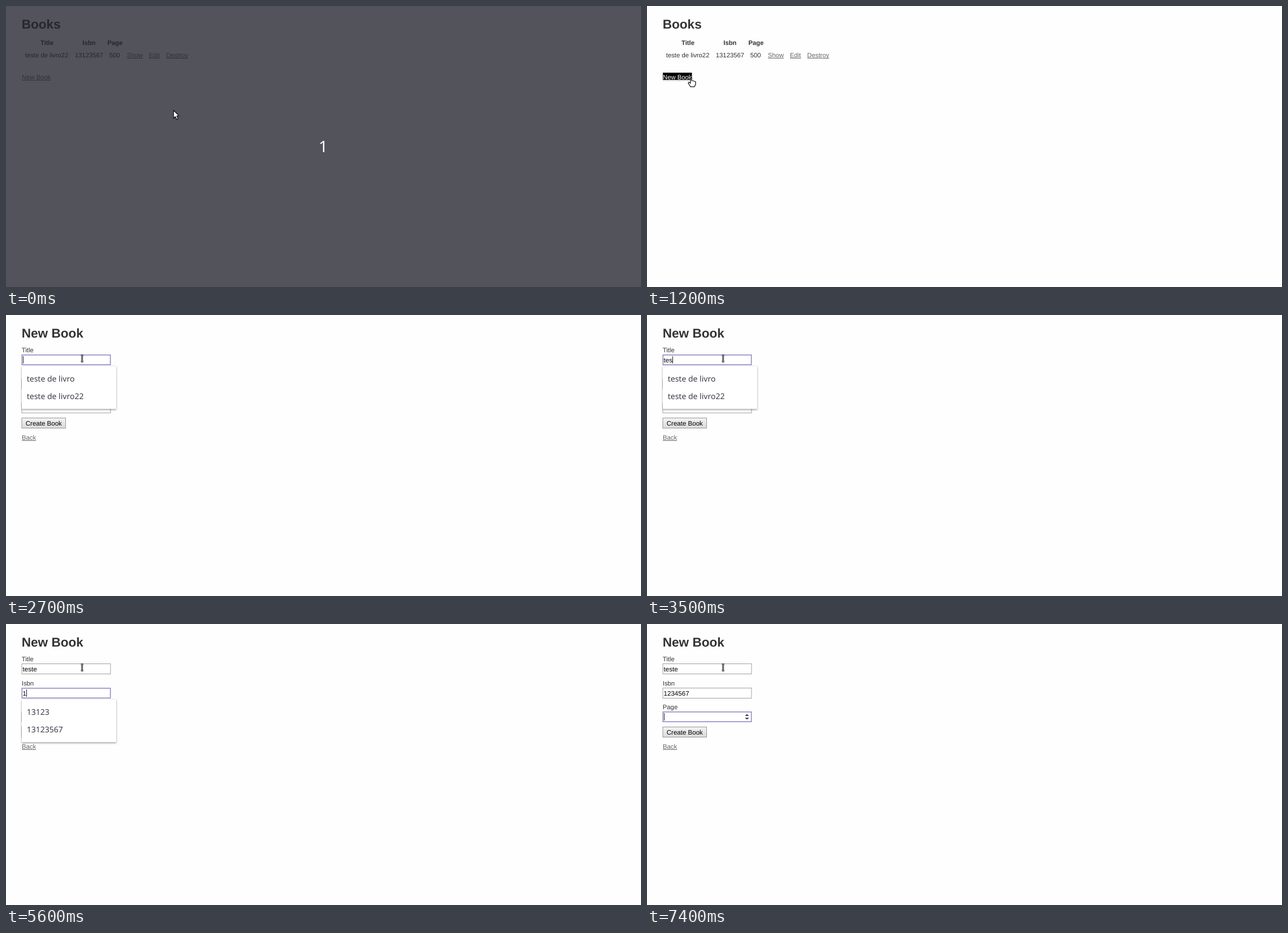
These frames come from a looping animation (1124x498 px, 8 s). An HTML page with a canvas:

```html
<!DOCTYPE html>
<html lang="en">
<head>
<meta charset="utf-8">
<title>New book form</title>
<style>
  html, body { margin: 0; width: 100%; height: 100%; overflow: hidden; background: #fefefe; }
  canvas { display: block; }
</style>
</head>
<body>
<canvas id="stage" width="1124" height="498"></canvas>
<script>
const ctx = document.getElementById('stage').getContext('2d');
const LOOP = 8000, STEP = 100;
const SANS = '"Liberation Sans", Arial, sans-serif';
const BODY = `11.3px ${SANS}`, BOLD = `bold 11.3px ${SANS}`;
const HEADING = `bold 22.6px ${SANS}`, CONTROL = `11.56px ${SANS}`;
const MENU = '500 14px "Noto Sans", "Open Sans", sans-serif';
const FIELD_TOP = [70, 113, 155];

// Each entry holds from its time until the next one.
const cursorKeys = [
  [0, 296, 184, 'arrow'], [1200, 78, 127, 'hand'], [1500, 79, 127, 'arrow'],
  [1800, 204, 137, 'arrow'], [2000, 161, 124.5, 'beam'], [2200, 149, 98, 'arrow'],
  [2300, 138, 80, 'beam'], [2400, 134.7, 77, 'beam']
];
const titleKeys = [[0, ''], [3400, 'te'], [3500, 'tes'], [4000, 'test'], [4100, 'teste']];
const isbnKeys = [[0, ''], [5500, '1'], [5800, '12'], [6000, '123'], [6200, '1234'],
  [6400, '12345'], [6600, '123456'], [6900, '1234567']];
const focusKeys = [[0, -1], [2500, 0], [4200, 1], [7400, 2]];
const caretKeys = [[0, true], [3100, false], [3400, true], [4600, false], [5200, true]];
const menuKeys = [
  [0, null], [2600, ['teste de livro', 'teste de livro22']],
  [4200, null], [5600, ['13123', '13123567']], [5800, null]
];

const keyAt = (keys, t) => keys.findLast(key => key[0] <= t);
const valueAt = (keys, t) => keyAt(keys, t)[1];

function text(str, x, y, font = BODY, color = '#333') {
  ctx.font = font;
  ctx.fillStyle = color;
  ctx.fillText(str, x, y);
  return ctx.measureText(str).width;
}

function link(str, x, y, hover = false) {
  ctx.font = BODY;
  const width = ctx.measureText(str).width;
  if (hover) {
    ctx.fillStyle = '#000';
    ctx.fillRect(x, y - 11.5, width, 14);
  }
  text(str, x, y, BODY, hover ? '#fff' : '#666');
  ctx.fillRect(x, Math.round(y) + 1, width, 1);
}

function box(x, y, w, h, fill, stroke, line = 1) {
  ctx.fillStyle = fill;
  ctx.fillRect(x, y, w, h);
  ctx.strokeStyle = stroke;
  ctx.lineWidth = line;
  ctx.strokeRect(x + line / 2, y + line / 2, w - line, h - line);
}

function polygon(points) {
  ctx.beginPath();
  points.forEach(([x, y]) => ctx.lineTo(x, y));
  ctx.closePath();
}

function drawCursor(x, y, shape) {
  ctx.save();
  ctx.translate(x, y);
  ctx.lineJoin = 'round';
  if (shape === 'beam') {
    const beam = new Path2D('M-2 -5.5 Q0 -5.5 0 -4.5 Q0 -5.5 2 -5.5 M0 -4.5 V4.5 M-2 5.5 Q0 5.5 0 4.5 Q0 5.5 2 5.5');
    for (const [color, width] of [['#111', 2.8], ['#fff', 0.8]]) {
      ctx.strokeStyle = color;
      ctx.lineWidth = width;
      ctx.stroke(beam);
    }
  } else {
    if (shape === 'arrow') {
      polygon([[.6, .8], [.6, 15], [3.7, 12], [6, 17], [8.4, 15.9], [6.2, 11], [10, 10.6]]);
    } else {
      polygon([[-1, 0], [1, 0], [1, 5], [8, 7], [8, 12], [6, 16], [-1, 16], [-5, 10], [-4, 8], [-1, 10]]);
    }
    ctx.fillStyle = '#fff';
    ctx.strokeStyle = '#111';
    ctx.lineWidth = 1.25;
    ctx.fill();
    ctx.stroke();
  }
  ctx.restore();
}

function drawList(hover) {
  text('Books', 27.7, 40, HEADING);
  text('Title', 61, 69, BOLD);
  text('Isbn', 135.3, 69, BOLD);
  text('Page', 179.5, 69, BOLD);
  text('teste de livro22', 33.8, 90.5);
  text('13123567', 121.8, 90.5);
  text('500', 182.7, 90.5);
  link('Show', 214, 90.5);
  link('Edit', 253, 90.5);
  link('Destroy', 283.6, 90.5);
  link('New Book', 28, 129.7, hover);
}

function drawSpinner(y) {
  ctx.fillStyle = '#444';
  for (const side of [-1, 1]) {
    polygon([[173.3, y + side * 1.5], [180.7, y + side * 1.5], [177, y + side * 5]]);
    ctx.fill();
  }
}

function drawMenu(items, top) {
  ctx.save();
  ctx.shadowColor = 'rgba(0,0,0,.4)';
  ctx.shadowBlur = 3;
  ctx.shadowOffsetY = 1;
  ctx.fillStyle = '#fff';
  ctx.fillRect(28, top + 21, 167, 75.5);
  ctx.restore();
  items.forEach((item, i) => text(item, 36.7, top + 48 + i * 31, MENU, '#3b3b48'));
}

function drawForm(t) {
  const focus = valueAt(focusKeys, t);
  const values = [valueAt(titleKeys, t), valueAt(isbnKeys, t), ''];
  text('New Book', 27.7, 40, HEADING);
  ['Title', 'Isbn', 'Page'].forEach((label, i) => {
    const top = FIELD_TOP[i], active = i === focus;
    text(label, 27.8, top - 4.2);
    box(27.5, top, 158, 19, '#fff', active ? '#918bc4' : '#a0a0a0', active ? 1.6 : 1);
    const width = text(values[i], 29.6, top + 13.5, CONTROL, '#000');
    if (active && valueAt(caretKeys, t)) {
      ctx.fillStyle = '#222';
      ctx.fillRect(Math.round(29.6 + width), top + 3, 1, 13);
    }
  });
  if (focus === 2) drawSpinner(164.5);

  const shade = ctx.createLinearGradient(0, 182, 0, 201);
  shade.addColorStop(0, '#f4f4f4');
  shade.addColorStop(1, '#d9d9d9');
  box(27.5, 182, 78.5, 19, shade, '#999');
  text('Create Book', 34.7, 195.5, CONTROL, '#000');
  link('Back', 28, 220.8);

  const items = valueAt(menuKeys, t);
  if (items) drawMenu(items, FIELD_TOP[focus]);
}

function cursorAt(t) {
  let [, x, y, shape] = keyAt(cursorKeys, t);
  if (t >= 600 && t < 1200) {
    const p = (t - 500) / 700, ease = p * p * (3 - 2 * p);
    x += (78 - x) * ease;
    y += (127 - y) * ease;
  }
  return [x, y, shape];
}

function draw(now) {
  const t = Math.floor(now % LOOP / STEP) * STEP;
  ctx.textRendering = 'geometricPrecision';
  ctx.fillStyle = '#fefefe';
  ctx.fillRect(0, 0, 1124, 498);
  if (t < 1500) drawList(t >= 1200);
  else drawForm(t);
  if (t < 400) {
    ctx.fillStyle = 'rgba(35,37,45,.78)';
    ctx.fillRect(0, 0, 1124, 498);
    text('1', 553.6, 259, '28px "Noto Sans", sans-serif', '#fff');
  }
  drawCursor(...cursorAt(t));
  requestAnimationFrame(draw);
}
requestAnimationFrame(draw);
</script>
</body>
</html>
```
